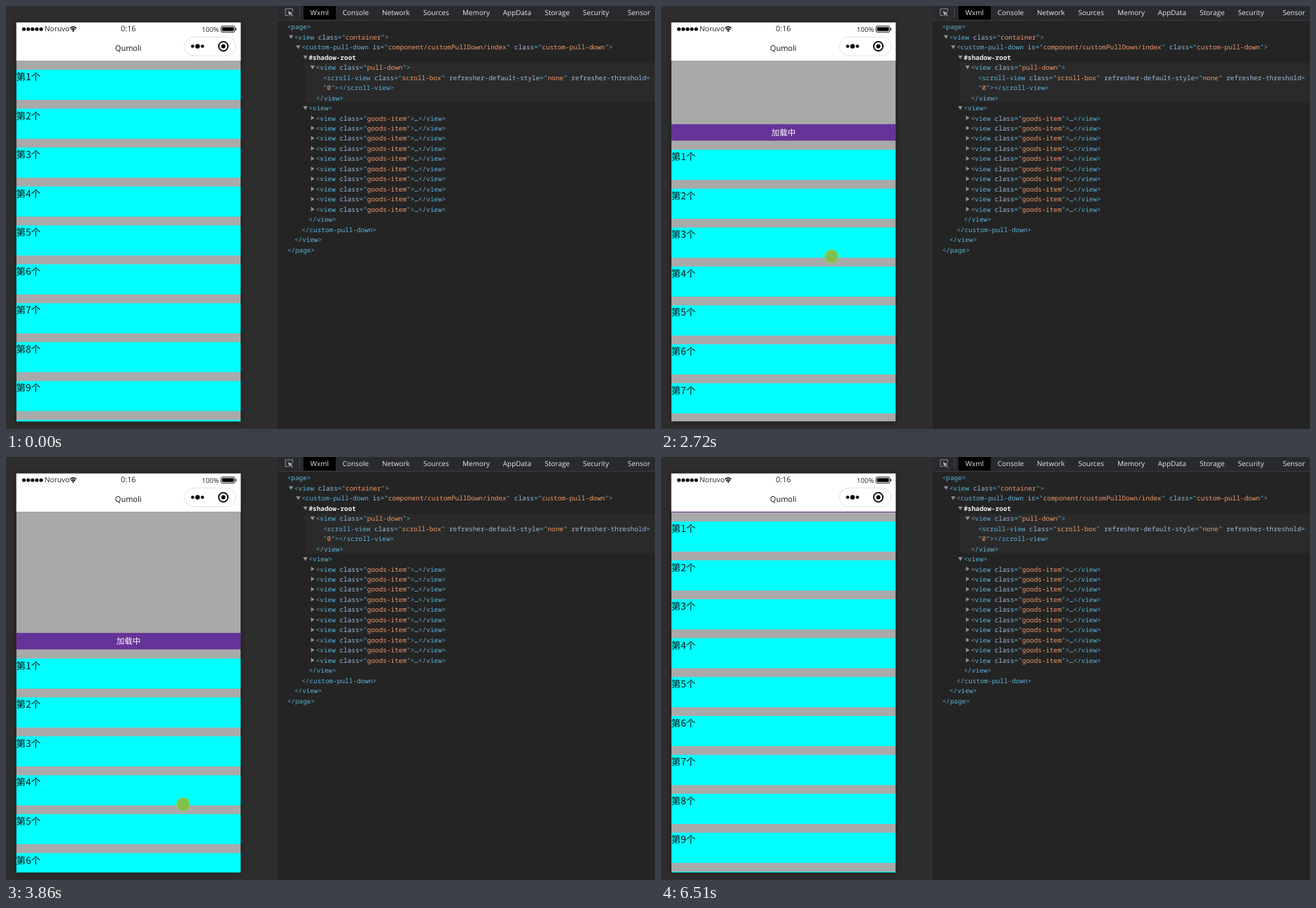
These frames come from a looping animation (927x604 px, 7370 ms). An HTML page:

```html
<!DOCTYPE html>
<html lang="en">
<head>
<meta charset="utf-8">
<title>Pull to refresh</title>
<style>
html, body { margin: 0; width: 100%; height: 100%; overflow: hidden; background: #242424; }
svg { display: block; width: 927px; height: 604px; }
text { white-space: pre; text-rendering: geometricPrecision; }
.ui { font-family: "Open Sans", "Noto Sans", sans-serif; }
.cjk { font-family: "Noto Sans CJK SC", "Noto Sans CJK", sans-serif; }
.code { font: 9.4px "Noto Sans Mono", "DejaVu Sans Mono", monospace; fill: #5db0d7; }
.attr { fill: #9bbbdc; }
.value { fill: #f29766; }
.plain { fill: #d8d8d8; }
.root { fill: #f0f0f0; font-weight: 600; }
.mid { text-anchor: middle; }
.medium { font-weight: 500; }
</style>
</head>
<body>
<svg id="stage" viewBox="0 0 927 604"></svg>
<script>
const LOOP = 7370;
const TICKS = 59;          // the picture refreshes this many times per loop
const PRESS = 18, RELEASE = 34, LEAVE = 52;
const BAR = 23.5;
const PHONE = { x: 14.7, y: 23.5, w: 320.6, h: 569.8 };
const PAGE_TOP = 78;

// Pointer stops: tick, x, y
const path = [
  [3, 855, 579], [5, 461, 507], [7, 401, 409], [10, 401, 409], [12, 242, 167], [15, 237, 152],
  [PRESS, 234, 167], [20, 241, 277], [24, 246, 438], [28, 251, 478], [33, 254.5, 508],
  [41, 254.5, 508], [43, 277, 506], [45, 633, 481], [51, 859, 596]];

function pointerAt(tick) {
  const next = path.findIndex(stop => stop[0] >= tick);
  if (next < 1) return path.at(next).slice(1);
  const [a, b] = [path[next - 1], path[next]];
  const k = (tick - a[0]) / (b[0] - a[0]);
  return [1, 2].map(i => a[i] + (b[i] - a[i]) * k);
}

// The list chases its limit while held and springs back almost to zero when let go.
function pullAt(tick) {
  if (tick < PRESS) return 0;
  if (tick < RELEASE) return Math.max(0, 214 - 217.4 * 0.823 ** (tick - PRESS));
  return 1 + 54 * 0.1 ** (tick - RELEASE);
}

const rect = (x, y, w, h, fill, extra = "") =>
  `<rect x="${x}" y="${y}" width="${w}" height="${h}" fill="${fill}" ${extra}/>`;
const dot = (x, y, r, fill = "#000", extra = "") =>
  `<circle cx="${x}" cy="${y}" r="${r}" fill="${fill}" ${extra}/>`;
const label = (x, y, size, str, fill, cls = "ui") =>
  `<text x="${x}" y="${y}" font-size="${size}" fill="${fill}" class="${cls}">${str}</text>`;
const repeat = (n, fn) => Array.from({ length: n }, (_, i) => fn(i)).join("");

function highlight(source) {
  return source.replace(/</g, "&lt;").replace(/"([^"]*)"|([\w-]+)(?==)|…/g, (all, value, attr) =>
    attr ? `<tspan class="attr">${attr}</tspan>`
      : value !== undefined ? `"<tspan class="value">${value}</tspan>"`
      : `<tspan class="plain">${all}</tspan>`);
}

// Two spaces per level; "v" marks an open node, ">" a closed one.
const tree = `
.<page>
  v<view class="container">
    v<custom-pull-down is="component/customPullDown/index" class="custom-pull-down">
      v#shadow-root
        v<view class="pull-down">
          .<scroll-view class="scroll-box" refresher-default-style="none" refresher-threshold=
          ."0"></scroll-view>
        .</view>
      v<view>
${'        ><view class="goods-item">…</view>\n'.repeat(10)}      .</view>
    .</custom-pull-down>
  .</view>
.</page>`.trim().split("\n");

function treeLine(line, i) {
  const [, indent, arrow, source] = line.match(/^( *)(.)(.*)$/);
  const x = 401.7 + 5.12 * indent.length, y = 33.2 + 14.48 * i;
  const shape = { v: `M${x - 8} ${y - 6}h6.4l-3.2 5.4z`, ">": `M${x - 7} ${y - 7}v6.6l5-3.3z` }[arrow];
  return (shape ? `<path d="${shape}" fill="#919191"/>` : "") +
    `<text x="${x}" y="${y}" class="code${source[0] === "#" ? " root" : ""}">${highlight(source)}</text>`;
}

const tabs = { Wxml: 434.7, Console: 480.7, Network: 537, Sources: 596, Memory: 652,
  AppData: 709.7, Storage: 769.5, Security: 824, Sensor: 888 };

const inspector =
  rect(388, 0, 539, 604, "#242424") +
  rect(388, 0, 539, 20, "#292a2d") + rect(388, 20, 539, 1, "#3c3c3e") +
  rect(425, 0, 46, 19.5, "#000") + rect(419, 2, 1, 14, "#46484b") +
  `<path d="M403 13.5h-4v-9.5h10.5v4" fill="none" stroke="#8f9296"/>
   <path d="M402.5 7l7.5 3-3 1 3 3-1 1-3-3-1.2 2.8z" fill="#a2a5a9"/>` +
  Object.entries(tabs).map(([name, x]) => label(x, 12.6, 10, name, "#e6e8ec")).join("") +
  rect(427, 81, 500, 56.5, "#2a2a2a") +
  tree.map(treeLine).join("");

const header =
  rect(PHONE.x, PHONE.y, PHONE.w, PAGE_TOP - PHONE.y, "#fff") +
  repeat(5, i => dot(25.6 + 6.15 * i, 33, 2.6)) +
  label(55, 36.4, 10.3, "Noruvo", "#222") +
  `<g fill="none" stroke="#000" stroke-width="1.5">
     <path d="M91.5 31.8q4.5-4 9 0M93.2 33.9q2.8-2.5 5.6 0"/>
   </g>` + dot(96, 35.5, 1.2) +
  label(174.8, 36.2, 10.8, "0:16", "#222", "ui mid") +
  label(279.7, 36.7, 9.6, "100%", "#222") +
  rect(307, 28.7, 20, 8.6, "none", 'rx="2" stroke="#000" stroke-width=".9"') +
  rect(308.5, 30.2, 17, 5.6, "#000", 'rx="1"') + rect(327.8, 31.5, 1.2, 3, "#000") +
  label(174.7, 63.8, 11, "Qumoli", "#111", "ui mid") +
  rect(254.7, 44.2, 74, 26.8, "#fff", 'rx="13.4" stroke="#e2e2e5"') +
  repeat(3, i => dot(266.6 + 7 * i, 57.5, i === 1 ? 3.2 : 2.3)) +
  dot(310.4, 57.5, 6.6, "none", 'stroke="#000" stroke-width="1.8"') + dot(310.4, 57.5, 2.9);

const item = i => {
  const y = 91 + 55.56 * i;
  return rect(PHONE.x, y, PHONE.w, 43, "#0ff") +
    label(14.6, y + 15, 13.65, `第${i + 1}个`, "#111", "cjk");
};

const pageBox = fill => rect(PHONE.x, PAGE_TOP, PHONE.w, PHONE.y + PHONE.h - PAGE_TOP, fill);

const list =
  `<g clip-path="url(#page)">
    ${pageBox("#a9a9a9")}
    <g id="list">
      ${rect(PHONE.x, PAGE_TOP - BAR, PHONE.w, BAR, "#639")}
      ${label(175, 70.7, 11.5, "加载中", "#fff", "cjk mid medium")}
      ${repeat(10, item)}
    </g>
    ${rect(330, 82, 2.6, 502, "#808080", 'id="scrollbar" rx="1.3" opacity=".6"')}
  </g>`;

const pointers =
  `<g id="touch">${dot(0, 0, 9, "#333", 'opacity=".58" filter="url(#soft)"')}</g>
   <g id="press">${dot(0, 0, 9.4, "#84bd42", 'fill-opacity=".93" stroke="#8fd45c" stroke-opacity=".8" stroke-width="1.4"')}</g>
   <path id="arrow" d="M.4.6v12.6l2.9-2.7 1.9 4.2 2-.9-1.9-4.1h4.1z" fill="#fff" stroke="#000" stroke-width=".7"/>`;

document.getElementById("stage").innerHTML =
  `<defs>
    <clipPath id="page">${pageBox("#000")}</clipPath>
    <filter id="soft" x="-30%" y="-30%" width="160%" height="160%"><feGaussianBlur stdDeviation=".8"/></filter>
    <filter id="shade" x="-10%" y="-10%" width="120%" height="120%"><feGaussianBlur stdDeviation="5"/></filter>
  </defs>` +
  rect(0, 0, 388, 604, "#2e2e2e") +
  rect(PHONE.x, PHONE.y, PHONE.w, PHONE.h, "#000", 'opacity=".4" filter="url(#shade)"') +
  inspector + header + list + pointers;

const part = Object.fromEntries(["list", "scrollbar", "touch", "press", "arrow"]
  .map(id => [id, document.getElementById(id)]));
const show = (node, on) => node.setAttribute("visibility", on ? "visible" : "hidden");
const move = (node, x, y) => node.setAttribute("transform", `translate(${x} ${y})`);

function draw(time) {
  const tick = Math.floor((time % LOOP + 30) / (LOOP / TICKS));
  const [x, y] = pointerAt(tick);
  const visible = tick >= path[0][0] && tick < LEAVE;
  const onPhone = x < PHONE.x + PHONE.w;
  const pressed = tick >= PRESS && tick < RELEASE;

  move(part.list, 0, pullAt(tick));
  show(part.scrollbar, tick > PRESS && tick < PRESS + 3);
  show(part.touch, visible && onPhone && !pressed);
  show(part.press, visible && onPhone && pressed);
  show(part.arrow, visible && !onPhone);
  for (const name of ["touch", "press", "arrow"]) move(part[name], x, y);
}

const start = performance.now();
function frame() {
  draw(performance.now() - start);
  requestAnimationFrame(frame);
}
frame();
</script>
</body>
</html>
```
